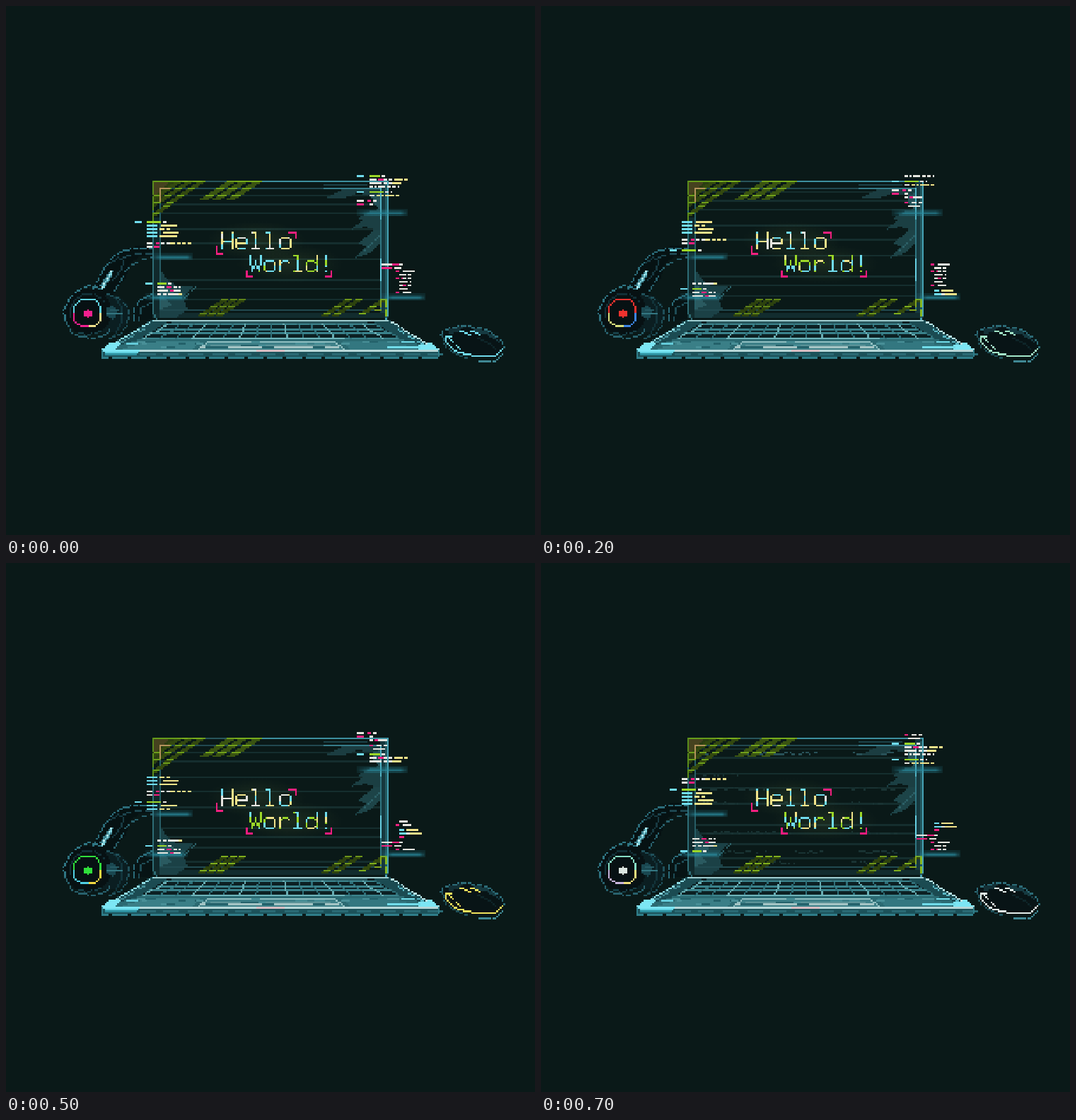
Write an HTML page with a canvas that moves like this. It is 748 px wide and 748 px high and loops after 800 ms.

```html
<!DOCTYPE html>
<html lang="en">
<head>
<meta charset="utf-8">
<title>Hello World</title>
<style>
html, body { margin: 0; width: 100%; height: 100%; overflow: hidden; background: #0a1918; }
canvas { display: block; width: 100vw; height: 100vh; image-rendering: pixelated; }
</style>
</head>
<body>
<canvas id="art" width="300" height="300" role="img" aria-label="Hello World!"></canvas>
<script>
const ctx = document.getElementById('art').getContext('2d');
const CELL = 748 / 300, STEP = 100, STEPS = 8;
const BG = '#0a1918';
const INK = { c: '#70dcee', g: '#9bd728', y: '#f0e28a', w: '#e6e6e0', p: '#f0207f' };

const mod = (a, n) => ((a % n) + n) % n;
const cell = v => Math.floor(v / CELL + 0.1);
const rand = (a, b, c) => {
  const v = Math.sin(a * 12.9898 + b * 78.233 + c * 37.719) * 43758.5453;
  return v - Math.floor(v);
};
const px = (x, y, w, h, color) => { ctx.fillStyle = color; ctx.fillRect(x, y, w, h); };
const bar = (x0, y, x1, color, h = 1) => px(cell(x0), cell(y), cell(x1) - cell(x0), h, color);

// Points are given in stage pixels as "x,y x,y ..."
const points = text => text.split(' ').map(p => p.split(',').map(v => cell(+v)));

function line(text, color, on = 1, period = 1) {
  const pts = points(text);
  let n = 0;
  for (let i = 1; i < pts.length; i++) {
    const [x0, y0] = pts[i - 1], [x1, y1] = pts[i];
    const len = Math.max(Math.abs(x1 - x0), Math.abs(y1 - y0), 1);
    for (let j = 0; j <= len; j++) {
      const x = Math.round(x0 + (x1 - x0) * j / len), y = Math.round(y0 + (y1 - y0) * j / len);
      if (n++ % period < on) px(x, y, 1, 1, color);
    }
  }
}

function poly(text, color) {
  const pts = points(text), ys = pts.map(p => p[1]);
  for (let y = Math.min(...ys); y <= Math.max(...ys); y++) {
    const hits = [];
    pts.forEach(([x0, y0], i) => {
      const [x1, y1] = pts[(i + 1) % pts.length], t = y + 0.5;
      if ((y0 <= t) !== (y1 <= t)) hits.push(x0 + (x1 - x0) * (t - y0) / (y1 - y0));
    });
    hits.sort((a, b) => a - b);
    for (let i = 0; i + 1 < hits.length; i += 2) {
      const a = Math.round(hits[i]);
      px(a, y, Math.round(hits[i + 1]) - a, 1, color);
    }
  }
}

function disc(cx, cy, r, color) {
  for (let y = -r; y <= r; y++) {
    const w = Math.round(Math.sqrt(r * r - y * y) * 0.98);
    px(cx - w, cy + y, w * 2 + 1, 1, color);
  }
}

function stripe(x, y, rows, w, bright, dim) {
  for (let i = 0; i < rows; i++) {
    const a = Math.max(84, cell(x) - 3 * (i >> 1) - (i & 1));
    const b = cell(x) + w - 3 * (i >> 1) - (i & 1);
    if (b > a) px(a, cell(y) + i, b - a, 1, i % 4 === 0 ? bright : dim);
  }
}

// Headphones
const RINGS = [
  ['#5fd2e2', '#efe08c', '#f0208f'], ['#ef8a3c', '#8bd86a', '#e0406a'],
  ['#f0322e', '#3c84e4', '#d8e07c'], ['#7a70e0', '#e07a58', '#4aa0e8'],
  ['#22d094', '#f0a638', '#a63ce8'], ['#30e03c', '#f0d840', '#50cfe4'],
  ['#a6de20', '#e8e49a', '#56d2e0'], ['#86ddc4', '#efe07c', '#c8b4dc']
];
const MARKS = ['#f0208f', '#ef6a50', '#f0322e', '#7a70e0', '#a63ce8', '#30e03c', '#5fdc50', '#dce6e0'];

function headphones(k) {
  poly('122,408 132,382 150,354 168,344 188,340 207,340 207,354 190,356 176,366 170,384 156,402 150,420', '#061213');
  line('120,402 130,388 138,370 150,355 166,346 184,342 207,342', '#2b6c7a', 4, 5);
  line('152,402 160,390 168,376 178,364 192,358 207,356', '#28606c', 4, 6);
  line('166,356 184,350 207,350', '#1d4650', 5, 7);
  line('148,362 158,356 166,360 162,372 150,388', '#173a42');
  poly('134,398 148,374 154,374 148,388 138,402', '#3c7f8c');
  line('132,401 140,390 148,375', '#bfeef2');
  line('135,400 144,388 151,376', '#7fd2dd', 3, 4);
  poly('180,444 182,426 192,414 207,408 207,444', '#071415');
  line('180,446 181,428 190,416 200,410 207,408', '#2b6c7a', 4, 5);
  line('188,444 191,428 207,418', '#1e4c56', 3, 4);
  disc(58, 174, 11, '#0b1e21');
  line('142,408 158,412 170,424 174,436 170,452 160,464 146,470', '#1f505a', 4, 5);
  line('152,412 162,426 162,448 152,464', '#12343b');
  disc(46, 173, 13, '#071113');
  line('84,446 82,430 88,414 100,402 116,396 132,400', '#2f7684', 5, 6);
  line('84,446 92,460 106,468 124,470 140,464 148,454', '#28616d', 4, 5);
  line('92,440 91,428 98,414 108,407 126,407 138,418', '#123037', 5, 6);
  line('102,462 116,464 132,460', '#173f47', 4, 5);
  poly('142,428 154,424 158,434 154,444 142,440', '#1a4851');
  bar(144, 434, 166, '#347782');
  bar(148, 430, 160, '#265a64');
  const [top, right, left] = RINGS[k];
  line('96,434 96,425 105,415 125,415 133,424 133,434', top);
  line('134,434 134,444 125,453 116,453', right);
  line('96,434 96,444 105,453 115,453', left);
  disc(46, 174, 2, MARKS[k]);
}

// Screen
const SCANS = [268, 281, 292, 315, 335, 358, 387, 399, 414, 436];

function screen(k) {
  poly('530,248 541,248 541,443 530,443', '#16383e');
  poly('208,300 218,300 218,443 208,443', '#10292c');
  bar(209, 434, 540, '#122c2e', 3);
  for (const y of SCANS) {
    const row = cell(y) - k;
    if (row > 104 && row < 172) px(88, row, 124, 1, '#152e2e');
  }
  if (k > 5) noise(k);
  poly('452,273 476,260 530,257 530,270 498,266 480,272', '#1b3d41');
  poly('516,270 530,266 530,290 522,282', '#27535a');
  poly('487,318 506,302 498,302 516,290 530,288 530,320 510,312', '#1b3f43');
  poly('495,357 510,340 498,338 522,318 530,318 530,338 514,350', '#1d4448');
  line('526,324 508,346', '#2c6067', 3, 4);
  poly('218,370 228,388 242,398 268,398 250,412 257,430 240,443 218,443', '#1b4146');
  poly('218,395 240,405 225,412 236,424 218,430', '#2a5a60');
  line('268,398 252,412', '#2c6067', 3, 4);

  // edges
  bar(208, 248, 541, '#28555b');
  bar(360, 248, 541, '#3d8f9f');
  line('208,248 208,434 213,443', '#2e6d76');
  line('540,248 540,436 536,443', '#46a2b4');
  line('537,252 537,440', '#235960');
  bar(218, 258, 530, '#214850');
  bar(450, 258, 530, '#367c8a');
  line('218,258 218,430', '#275e66');
  line('529,258 529,430', '#2f7682');
  line('529,258 529,300', '#50b1c3');
  line('529,358 529,388', '#66cfe2');
  bar(218, 430, 530, '#214a50');
  bar(450, 254, 512, '#1b4249');

  // green reflections
  poly('209,250 244,250 234,262 222,262 222,274 209,290', '#2b3d12');
  poly('210,250 234,250 224,258 218,270 210,270', '#46421f');
  [240, 256, 272].forEach((x, i) => stripe(x, 249, 12 + i, 4, '#6d9d1b', '#33490f'));
  stripe(224, 282, 8, 4, '#6d9d1b', '#33490f');
  [313, 331, 350].forEach(x => stripe(x, 249, 11, 5, '#709f1c', '#3a5411'));
  bar(208, 248, 242, '#669c1a');
  bar(250, 248, 258, '#76ac1c');
  bar(266, 248, 278, '#76ac1c');
  bar(326, 248, 361, '#76ac1c');
  line('208,248 208,302', '#5a8c1b', 8, 9);
  line('218,258 218,276', '#b3925b');
  bar(218, 258, 232, '#b3925b');
  [304, 318, 329].forEach(x => stripe(x, 414, 10, 4, k > 3 ? '#7fae1d' : '#5d8219', '#2d420e'));
  [480, 494].forEach(x => stripe(x, 414, 10, 4, '#6d951a', '#2d420e'));
  stripe(530, 416, 9, 4, '#7fae1d', '#33490f');
  line('538,418 538,438', '#85b820', 4, 5);
  line('529,418 529,430 516,430', '#85a61e', 4, 6);
}

function noise(k) {
  const rows = k === 6 ? [266, 270, 299, 320, 410, 425] : [267, 297, 317, 338, 380, 408, 422];
  rows.forEach((y, r) => {
    for (let x = 92; x < 202; x++) {
      const shown = rand(x >> 4, r, k) > 0.42 && rand(x, r, k + 3) > 0.35;
      if (shown) px(x, cell(y) + (rand(x >> 1, r, 9) > 0.5 ? 1 : 0), 1, 1, r ? '#193333' : '#285158');
    }
  });
}

// Lettering: each glyph is a set of x, y, w, h boxes in base 36
const GLYPHS = {
  H: '001a 601a 1551', e: '1351 0415 6413 1651 1951', l: '1031 301a 1951',
  o: '1351 0415 6415 1951', W: '0016 6016 1614 5614 3313 2612 4612',
  r: '1317 2411 3331 6411', d: '601a 1341 0415 1941 5411 5811', '!': '3017 3911'
};

function word(text, x, y, inks, k) {
  [...text].forEach((ch, i) => GLYPHS[ch].split(' ').forEach(box => {
    const [a, b, w, h] = [...box].map(d => parseInt(d, 36));
    for (let dx = 0; dx < w; dx++) for (let dy = 0; dy < h; dy++) {
      const cx = x + i * 8 + (i === 4 && ch === 'o' ? 1 : 0) + a + dx, cy = y + b + dy;
      const n = Math.floor(rand(cx >> 2, Math.floor(cy / 3), k) * inks.length);
      px(cx, cy, 1, 1, INK[inks[n]]);
    }
  }));
}

function glow(x, y, rx, ry) {
  ctx.save();
  ctx.translate(x, y);
  ctx.scale(rx, ry);
  const g = ctx.createRadialGradient(0, 0, 0, 0, 0, 1);
  g.addColorStop(0, 'rgba(120,140,70,.16)');
  g.addColorStop(1, 'rgba(120,140,70,0)');
  ctx.fillStyle = g;
  ctx.fillRect(-1, -1, 2, 2);
  ctx.restore();
}

function lettering(k) {
  glow(142, 133, 28, 11);
  glow(161, 146, 30, 11);
  word('Hello', 122, 128, k === 6 ? 'wwwyc' : 'cywcy', k);
  word('World!', 138, 141, 'cgygc', k);
  const pink = k === 6 ? '#f030c4' : '#ee1c7e';
  line('400,321 410,321 410,328', INK.p);
  line('298,340 298,350 306,350', INK.p);
  line('340,375 340,382 348,382', pink);
  line('452,382 460,382 460,376', pink);
}

// Floating code: row = [position, dashes]; capitals mean dotted
const CODE = [
  { top: 122, cycle: 18, from: -1, to: 17, shift: [0, 1, 2, 3, 4, 5, 7, 12], rows: [
    [0, 'c182-194 g200-220 W222-230'], [2, 'c200-215 y220-238 Y239-243'],
    [4, 'c200-215 y218-226 Y228-232'], [6, 'c200-215 y224-240 Y241-245'],
    [8, 'c200-215 y218-238 Y239-243'], [12, 'w200-209 p212-218 W220-232 y233-240 Y242-265'],
    [14, 'w200-208 p211-219']] },
  { top: 156, cycle: 9, from: 0, to: 8, shift: [0, 3, 6, 0, 3, 6, 0, 3], rows: [
    [1, 'c197-209 g215-229 W231-239'], [3, 'w215-225 p228-235 W237-248'],
    [5, 'w215-230 P232-237 w238-248'], [7, 'W215-228 w230-245 Y246-251']] },
  { top: 96, cycle: 26, from: -1, to: 17, shift: [0, 3, 6, 9, 12, 14, 18, 20], rows: [
    [0, 'c496-508 g514-529 W531-539'], [2, 'w514-525 p528-534 W535-546 y550-563 Y564-570'],
    [4, 'w514-532 W534-546 y548-560'], [6, 'W514-525 w527-538 W540-557'],
    [9, 'c496-508 g514-535 W537-546'], [11, 'w514-523 Y524-534 y538-550 Y551-557'],
    [14, 'w496-508 p511-517 W519-526'], [16, 'p496-508 W514-522'],
    [18, 'W514-520 p521-527 w528-540'], [21, 'P514-522 w524-532 W534-540'],
    [23, 'w519-531 W533-538']] },
  { top: 145, cycle: 26, from: 0, to: 18, shift: [0, 2, 4, 7, 10, 14, 16, 18], rows: [
    [1, 'w533-546 p548-556 W558-565'], [3, 'p533-546 w550-559'],
    [5, 'P552-560 w563-574 W575-580'], [7, 'w556-568 W569-575'],
    [9, 'P552-562 W563-577'], [11, 'w556-570 W571-575'], [13, 'W556-562 p563-568 W570-576'],
    [15, 'w556-569'], [17, 'P552-560 w562-575'], [20, 'c556-564 y567-579 Y580-584'],
    [22, 'c556-566 W568-571 y573-584 Y585-589'], [24, 'p556-564']] }
];

function dashes(text, y) {
  for (const [, ink, a, b] of text.matchAll(/(\w)(\d{3})-(\d+)/g)) {
    const x0 = cell(+a), x1 = cell(+b), dotted = ink < 'a';
    for (let x = x0; x < x1; x++)
      if (!dotted || (x - x0) % 3 < 2) px(x, y, 1, 1, INK[ink.toLowerCase()]);
  }
}

function haze(x0, x1, y) {
  const a = cell(x0), w = cell(x1) - a;
  ['.16', '.38', '.72', '.32'].forEach((o, i) => {
    const g = ctx.createLinearGradient(a, 0, a + w, 0);
    g.addColorStop(0, 'rgba(42,142,162,.1)');
    g.addColorStop(0.25, `rgba(42,142,162,${o})`);
    g.addColorStop(0.85, `rgba(42,142,162,${o})`);
    g.addColorStop(1, 'rgba(42,142,162,.12)');
    px(a, cell(y) + i, w, 1, g);
  });
}

function code(k) {
  haze(496, 569, 288);
  haze(207, 265, 350);
  haze(533, 594, 408);
  haze(197, 257, 407);
  for (const { top, cycle, from, to, shift, rows } of CODE)
    for (const [base, text] of rows) {
      const at = mod(base - shift[k], cycle);
      for (const p of [at, at - cycle])
        if (p >= from && p <= to) dashes(text, top + p);
    }
}

// Keyboard and base
function base() {
  poly('208,446 541,446 613,486 136,486', '#1b4b52');
  poly('230,447 520,447 560,472 190,472', '#0c2023');
  for (let r = 0; r < 4; r++) {
    const y = 451 + r * 6, spread = r * 11;
    bar(226 - spread, y, 524 + spread, '#3a828b');
    for (let i = 0; i < 17; i++) {
      const u = i / 16, x = 228 - spread + u * (294 + spread * 2);
      line(`${x},${y} ${x + (u - 0.5) * 16},${y + 5}`, i % 3 ? '#2f6f78' : '#69aeb4');
    }
  }
  bar(262, 470, 480, '#6eb4ba');
  poly('190,472 560,472 613,487 136,487', '#2b6a72');
  poly('204,474 276,474 262,486 160,486', '#3a7f87');
  poly('474,474 545,474 588,486 490,486', '#337780');
  poly('285,474 466,474 476,487 272,487', '#3d8088');
  line('272,484 286,474 466,474 476,484', '#8fbfc1');
  bar(290, 479, 460, '#5a9297');
  bar(276, 483, 472, '#a4c4c4');
  for (let i = 0; i < 26; i++) {
    const x = 176 + rand(i, 2, 1) * 390;
    bar(x, 474 + Math.floor(rand(i, 5, 2) * 4) * 2.5, x + 8 + rand(i, 7, 3) * 14, i % 2 ? '#23616a' : '#488f97');
  }
  bar(208, 445, 541, '#9fcdd0');
  bar(236, 448, 512, '#28565c');
  line('136,485 160,471 207,446', '#8edce5', 5, 6);
  line('612,485 588,471 541,446', '#b9e6e8', 5, 6);
  line('145,484 168,472 198,456', '#458e98', 4, 6);
  line('604,484 580,472 550,456', '#5ab7c4', 4, 6);
  poly('136,486 148,478 164,478 156,487', '#7ce6f4');
  poly('612,486 602,478 580,482 588,487', '#7ce6f4');
  bar(560, 474, 580, '#71dce9');
  bar(170, 477, 188, '#64cad8');
  bar(540, 483, 586, '#71dce9');
  bar(136, 488, 613, '#b7d7d8');
  bar(136, 488, 190, '#7ce6f4');
  bar(355, 488, 394, '#d8bfc4');
  bar(136, 490, 613, '#1c525a', 3);
  bar(140, 490, 188, '#5ed0df');
  for (let x = 190; x < 600; x += 34) bar(x, 491, x + 22, '#2a6a74');
  line('136,488 136,496 612,496 612,488', '#2f7d89', 9, 11);
  px(cell(140), cell(493), 18, 1, '#2d909f');
}

// Mouse
const TRIMS = ['#70d9eb', '#88e2da', '#a2e6c8', '#b6e284', '#c7dc3c', '#f0e25c', '#f0e0a0', '#e4eeea'];

function mouse(k) {
  poly('615,462 626,455 646,453 668,454 684,460 698,472 703,484 694,496 664,496 640,490 622,478', '#081416');
  poly('660,455 680,459 694,470 698,478 680,466 664,464', '#163a41');
  poly('628,457 648,454 640,462 626,466', '#132f35');
  line('615,466 616,460 626,455 646,453 668,454 684,460 698,472 703,482', '#2c6b77', 4, 5);
  line('616,466 622,482 638,492 652,496', '#20525b', 4, 5);
  line('670,502 692,502 703,490', '#3f8793', 7, 8);
  line('666,470 684,476 692,484', '#0e2529');
  const trim = TRIMS[k];
  line('630,467 622,468 622,474 634,486 650,492 666,495 692,495 702,485', trim);
  line('625,468 638,480 648,489', trim, 4, 5);
  line('642,459 648,459 656,465', trim);
  line('657,459 662,459 668,466', trim, 3, 4);
}

function draw(k) {
  px(0, 0, 300, 300, BG);
  headphones(k);
  screen(k);
  lettering(k);
  base();
  code(k);
  mouse(k);
}

let shown = -1;
function tick() {
  const k = Math.floor(performance.now() / STEP) % STEPS;
  if (k !== shown) draw(shown = k);
  requestAnimationFrame(tick);
}
tick();
</script>
</body>
</html>
```
